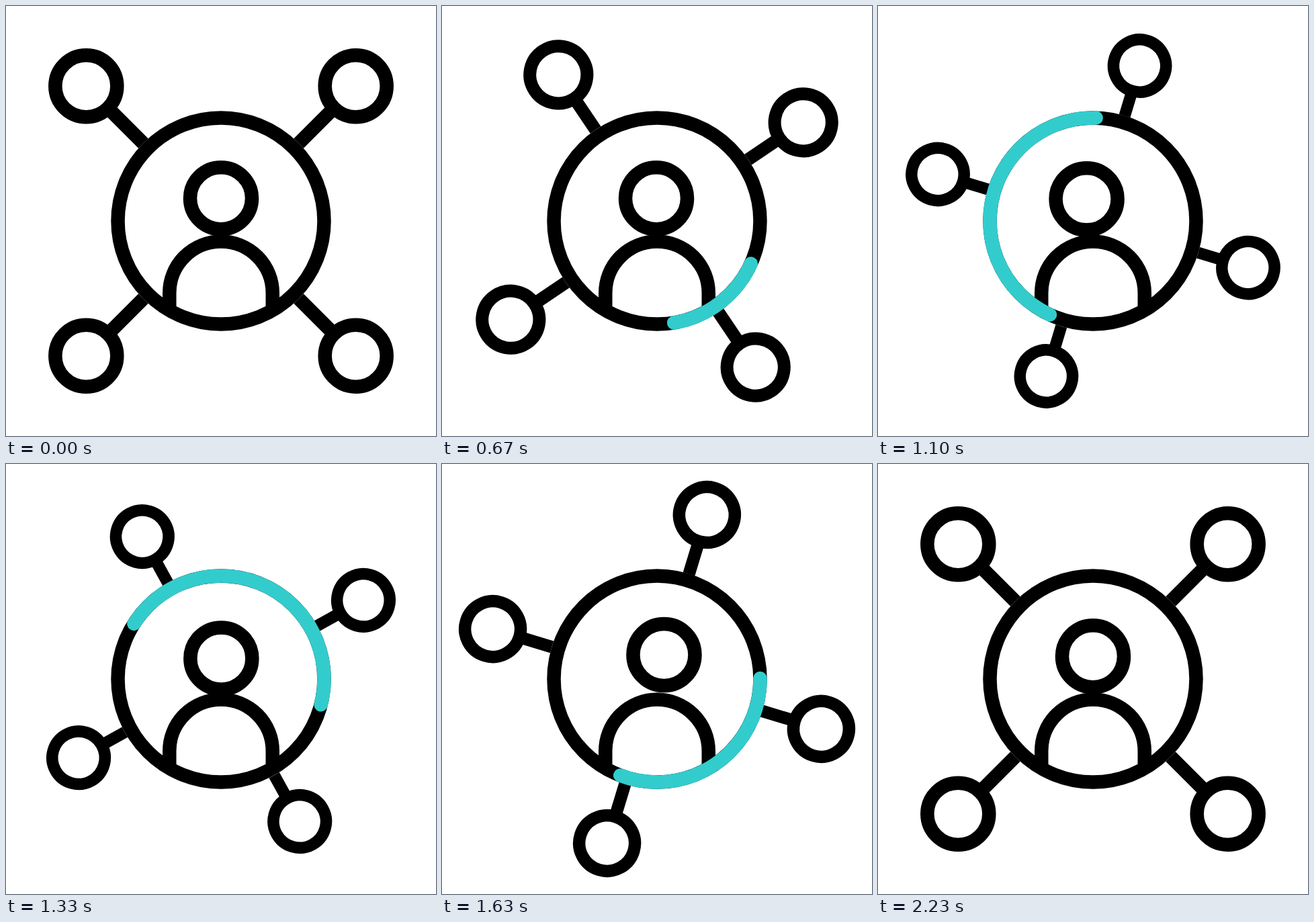
An HTML page that plays this animation: 640 px wide and 640 px high, repeating every 2.5 s.

```html
<!DOCTYPE html>
<html lang="en">
<head>
<meta charset="utf-8">
<title>Network person</title>
<style>
  html, body { margin: 0; width: 100%; height: 100%; overflow: hidden; background: #fff; }
  svg { display: block; width: 100%; height: 100%; }
  .line { fill: none; stroke: #000; stroke-width: 20.5; }
  #arc { stroke: #33cccd; stroke-linecap: round; }
</style>
</head>
<body>
<svg viewBox="0 0 640 640">
  <defs>
    <g id="arm" class="line">
      <path d="M150 0H238"/>
      <circle cx="283.8" r="46"/>
    </g>
  </defs>
  <g transform="translate(320 320)">
    <g id="arms">
      <use href="#arm" transform="rotate(45)"/>
      <use href="#arm" transform="rotate(135)"/>
      <use href="#arm" transform="rotate(225)"/>
      <use href="#arm" transform="rotate(315)"/>
    </g>
    <circle r="163.75" fill="#fff"/>
    <path class="line" d="M-76.75 128V107.25A76.75 76.75 0 0 1 76.75 107.25V128"/>
    <circle id="head" class="line" cy="-33.7" r="46"/>
    <circle class="line" r="153.5"/>
    <path id="arc" class="line"/>
  </g>
</svg>
<script>
const LOOP = 2500, FPS = 30, RADIUS = 153.5;
const [arms, head, arc] = ['arms', 'head', 'arc'].map(id => document.getElementById(id));

const clamp = x => Math.min(1, Math.max(0, x));
const progress = (k, from, to) => clamp((k - from) / (to - from));
const smooth = p => p * p * (3 - 2 * p);

// Symmetric cubic-bezier(a, 0, 1 - a, 1), solved by bisection.
function ease(p, a = 0.53) {
  let lo = 0, hi = 1;
  for (let i = 0; i < 30; i++) {
    const s = (lo + hi) / 2, r = 1 - s;
    const x = 3 * a * r * r * s + 3 * (1 - a) * r * s * s + s * s * s;
    if (x < p) lo = s; else hi = s;
  }
  return smooth((lo + hi) / 2);
}

// Monotone cubic curve through [step, value] points, flat at both ends.
function track(points) {
  const last = points.length - 1;
  const slope = i => (points[i + 1][1] - points[i][1]) / (points[i + 1][0] - points[i][0]);
  const tangent = points.map((_, i) => {
    if (i === 0 || i === last) return 0;
    const a = slope(i - 1), b = slope(i);
    return a * b > 0 ? 2 * a * b / (a + b) : 0;
  });
  return k => {
    if (k <= points[0][0]) return points[0][1];
    if (k >= points[last][0]) return points[last][1];
    const i = points.findIndex(p => p[0] > k) - 1;
    const [k0, v0] = points[i], [k1, v1] = points[i + 1];
    const d = k1 - k0, p = (k - k0) / d, q = 1 - p;
    return v0 + (v1 - v0) * smooth(p) + d * p * q * (q * tangent[i] - p * tangent[i + 1]);
  };
}

const arcTail = track([[17, 0], [26, 0.042], [40, 0.352], [49, 0.676], [55, 0.891], [62, 1]]);
const arcTip = track([[11, 0], [14, 0.0145], [26, 0.375], [40, 0.802], [49, 0.985], [55, 1]]);

function headOffset(k) {
  const left = [-11.5, 0], right = [10.6, -2.4];
  if (k < 29) {
    const p = smooth(progress(k, 18, 29));
    return left.map(v => v * p);
  }
  if (k < 50) {
    const p = smooth(progress(k, 29, 50));
    const [x, y] = left.map((v, i) => v + (right[i] - v) * p);
    return [x, y + 4.4 * Math.sin(Math.PI * p)];
  }
  const p = 1 - smooth(progress(k, 50, 57));
  return right.map(v => v * p);
}

function point(deg) {
  const a = deg * Math.PI / 180;
  return `${(RADIUS * Math.cos(a)).toFixed(2)} ${(RADIUS * Math.sin(a)).toFixed(2)}`;
}

function draw(k) {
  const turn = ease(progress(k, 8, 67));
  const shrink = ease(progress(k, 8, 32)) - ease(progress(k, 36, 67));
  arms.setAttribute('transform', `rotate(${180 * turn}) scale(${1 - 0.15 * shrink})`);
  head.setAttribute('transform', `translate(${headOffset(k)})`);

  const start = 15 + 120 * turn;
  const from = start + 360 * arcTail(k), to = start + 360 * arcTip(k);
  const visible = to - from > 0.05;
  arc.setAttribute('d', visible
    ? `M${point(from)}A${RADIUS} ${RADIUS} 0 ${to - from > 180 ? 1 : 0} 1 ${point(to)}`
    : '');
}

const begin = performance.now();
function tick() {
  const t = (performance.now() - begin) % LOOP;
  draw(Math.floor(t * FPS / 1000 + 0.11));
  requestAnimationFrame(tick);
}
tick();
</script>
</body>
</html>
```
